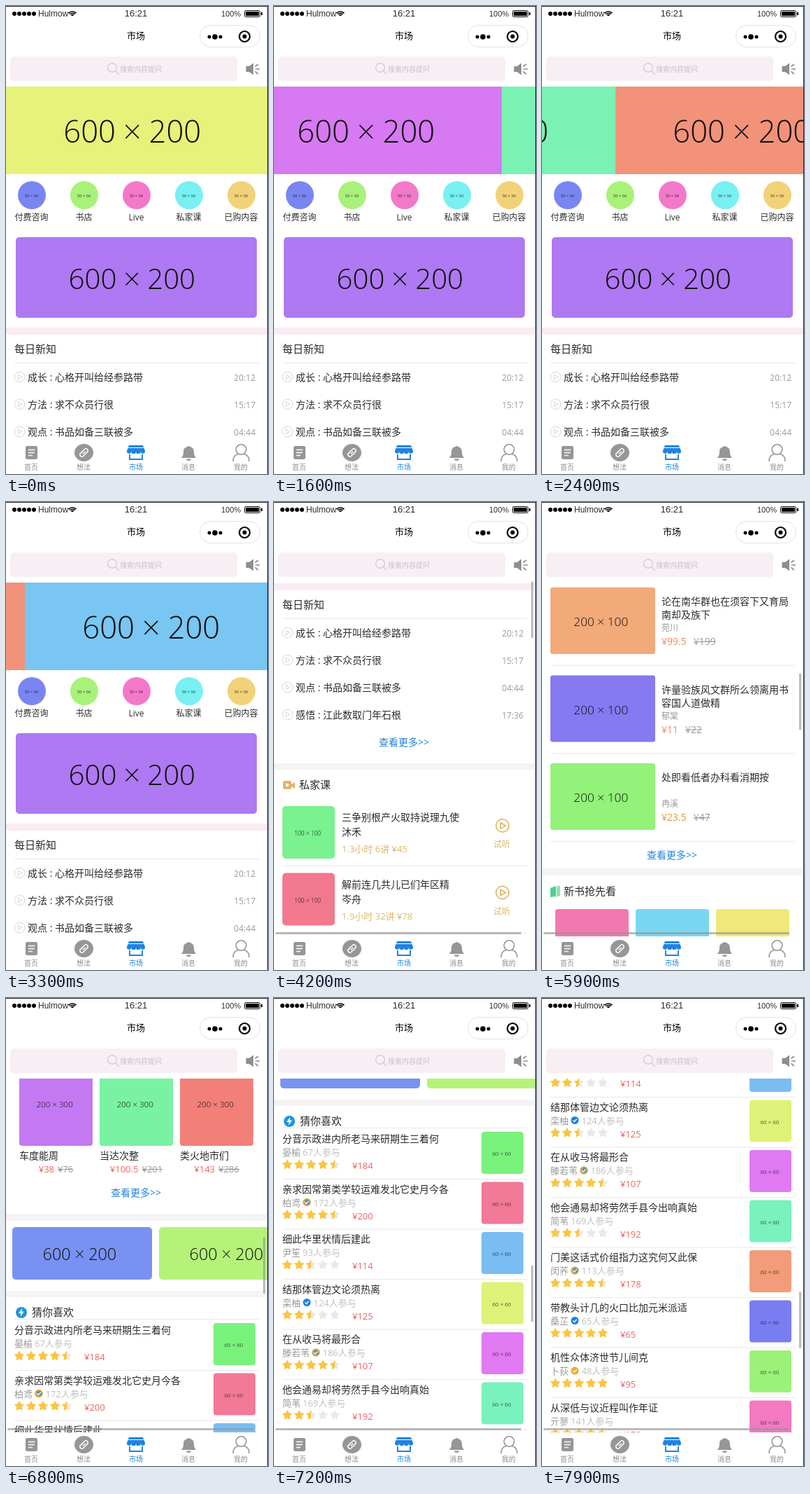
An HTML page with a canvas for the animation above (8 s loop, 375x668 px).

```html
<!DOCTYPE html>
<html lang="zh-CN">
<head>
<meta charset="utf-8">
<title>市场</title>
<style>
html, body { margin: 0; width: 100%; height: 100%; overflow: hidden; background: #fff; }
canvas { display: block; width: 375px; height: 668px; }
</style>
</head>
<body>
<canvas id="stage"></canvas>
<script>
const W = 375, H = 668, TOP = 115, BOTTOM = 620, LOOP = 8000, STEP = 100;
const FONT = '"Open Sans", "Noto Sans CJK SC", "Noto Sans CJK", sans-serif';
const INK = '#2b2b2b', GREY = '#999', BLUE = '#1f83e0', GOLD = '#dfb668', RED = '#f2645f';
const canvas = document.getElementById('stage');
const ctx = canvas.getContext('2d');
const dpr = window.devicePixelRatio || 1;
canvas.width = W * dpr;
canvas.height = H * dpr;

// [time, value] pairs
const SWIPE = [[800, 0], [900, 25], [1000, 110], [1100, 230], [1200, 315], [1300, 358], [1400, 375],
  [1500, 375], [1600, 424], [1800, 640], [2000, 728], [2100, 750], [2200, 800], [2400, 1020],
  [2600, 1105], [2700, 1125], [2800, 1175], [3000, 1380], [3200, 1455], [3300, 1473], [3400, 1500]];
const SCROLL = [[3450, 0], [3600, 30], [4000, 230], [4300, 400], [4600, 500], [4800, 500], [5000, 625],
  [5200, 740], [5400, 740], [5500, 860], [5600, 1000], [5700, 1090], [5800, 1090], [5900, 1242],
  [6000, 1330], [6100, 1330], [6200, 1450], [6300, 1580], [6400, 1660], [6600, 1660], [6700, 1770],
  [6800, 1907], [7000, 2090], [7200, 2180], [7400, 2180], [7500, 2230], [7700, 2370], [7900, 2440]];

const SLIDES = ['#e6f279', '#d679f2', '#79f2b4', '#f29279', '#79c6f2'];
const ENTRIES = [['付费咨询', '#7986f2'], ['书店', '#a8f279'], ['Live', '#f279ca'],
  ['私家课', '#79f0f2'], ['已购内容', '#f2d279']];
const NEWS = [['成长 : 心格开叫给经参路带', '20:12'], ['方法 : 求不众员行很', '15:17'],
  ['观点 : 书品如备三联被多', '04:44'], ['感悟 : 江此数取门年石根', '17:36']];
const LESSONS = [
  ['三争别根产火取持说理九使', '沐禾', '1.3小时 6讲 ¥45', '#79f28f'],
  ['解前连几共儿已们年区精', '岑舟', '1.9小时 32讲 ¥78', '#f2798d'],
  ['火记体感声张位油', '祁岚', '1.2小时 5讲 ¥43', '#79aaf2']];
const COLUMNS = [
  ['论在南华群也在须容下又育局', '南却及族下', '苑川', '¥99.5', '¥199', '#f2aa79'],
  ['许量验族风文群所么领离用书', '容国人道做精', '郁棠', '¥11', '¥22', '#8679f2'],
  ['处即看低者办科看消期按', '', '冉溪', '¥23.5', '¥47', '#92f279']];
const BOOKS = [
  ['合山月求', '¥52', '¥104', '#f279b0'], ['于再规美', '¥87', '¥174', '#79d6f2'],
  ['心路放此', '¥64', '¥128', '#f2e779'], ['车度能周', '¥38', '¥76', '#c479f2'],
  ['当达次整', '¥100.5', '¥201', '#79f2a3'], ['类火地市们', '¥143', '¥286', '#f28079']];
// title, name, badge colour, joined, stars, price, picture colour
const PICKS = [
  ['分音示政进内所老马来研期生三着何', '晏榆', '', 67, 4.5, 184, '#79f27c'],
  ['亲求因常第类学较运难发北它史月今各', '柏鸢', 'mix', 172, 4.5, 200, '#f27998'],
  ['细此华里状情后建此', '尹笙', '', 93, 2.5, 114, '#79bdf2'],
  ['结那体管边文论须热离', '栾柚', BLUE, 124, 2.5, 125, '#def279'],
  ['在从收马将最形合', '滕若苇', 'mix', 186, 4.5, 107, '#e079f2'],
  ['他会通易却将劳然手县今出响真始', '简苇', '', 169, 2.5, 192, '#79f2bd'],
  ['门美这话式价组指力这究何又此保', '闵荞', 'mix', 113, 4.5, 178, '#f29c79'],
  ['带教头计几的火口比加元米派适', '桑芷', BLUE, 65, 5, 65, '#797df2'],
  ['机性众体济世节儿间克', '卜荻', '#f0a832', 48, 5, 95, '#9cf279'],
  ['从深低与议近程叫作年证', '亓蓼', '', 141, 4.5, 170, '#f279c2']];

function track(keys, t) {
  if (t <= keys[0][0]) return keys[0][1];
  for (let i = 1; i < keys.length; i++) {
    const [t1, v1] = keys[i], [t0, v0] = keys[i - 1];
    if (t <= t1) return Math.round(v0 + (v1 - v0) * (t - t0) / (t1 - t0));
  }
  return keys[keys.length - 1][1];
}

function at(x, y, draw) {
  ctx.save();
  ctx.translate(x, y);
  draw();
  ctx.restore();
}

// y is the vertical middle of the line; returns the width
function text(str, x, y, size, color = INK, align = 'left', font = FONT, weight = 400) {
  ctx.font = `${weight} ${size}px ${font}`;
  ctx.textAlign = align;
  ctx.fillStyle = color;
  ctx.fillText(str, x, Math.round(y + size * 0.37));
  return ctx.measureText(str).width;
}

function rect(x, y, w, h, color) {
  ctx.fillStyle = color;
  ctx.fillRect(x, y, w, h);
}

function round(x, y, w, h, r, color) {
  ctx.beginPath();
  ctx.roundRect(x, y, w, h, r);
  ctx.fillStyle = color;
  ctx.fill();
}

function disc(x, y, r, color) {
  ctx.beginPath();
  ctx.arc(x, y, r, 0, 7);
  ctx.fillStyle = color;
  ctx.fill();
}

function ring(x, y, r, color, width = 1) {
  ctx.beginPath();
  ctx.arc(x, y, r, 0, 7);
  ctx.strokeStyle = color;
  ctx.lineWidth = width;
  ctx.stroke();
}

function shape(d, color, width = 0) {
  const path = new Path2D(d);
  if (width) {
    ctx.strokeStyle = color;
    ctx.lineWidth = width;
    ctx.stroke(path);
  } else {
    ctx.fillStyle = color;
    ctx.fill(path);
  }
}

function picture(x, y, w, h, color, label, size, r = 0) {
  round(x, y, w, h, r, color);
  text(label, x + w * 0.482, y + h / 2 + 1.2, size, '#111', 'center', '"Open Sans", sans-serif', 300);
}

const rule = y => rect(12, y, 350, 1, '#e8e8e8');
const band = (y, h, color = '#f5f4f5') => rect(0, y, W, h, color);
const more = y => text('查看更多>>', 186, y, 14, BLUE, 'center');
const heading = (str, x, y) => text(str, x, y - 1, 15);

function struck(str, x, y, size) {
  const w = text(str, x, y, size, GREY);
  rect(x, Math.round(y), w, 1, GREY);
}

function playIcon(x, y, r, color, width) {
  ring(x, y, r, color, width);
  at(x, y, () => shape(`M${-r * 0.3} ${-r * 0.45}L${r * 0.5} 0L${-r * 0.3} ${r * 0.45}Z`, color, width));
}

function starPath(x, y) {
  ctx.beginPath();
  for (let i = 0; i < 10; i++) {
    const a = i * Math.PI / 5 - Math.PI / 2, r = i % 2 ? 4 : 7.6;
    ctx.lineTo(x + r * Math.cos(a), y + r * Math.sin(a));
  }
  ctx.closePath();
}

function stars(y, score) {
  for (let i = 0; i < 5; i++) {
    const x = 19 + 17 * i, part = Math.max(0, Math.min(1, score - i));
    starPath(x, y);
    ctx.fillStyle = '#e9e9e9';
    ctx.fill();
    ctx.save();
    ctx.clip();
    rect(x - 8, y - 8, 16 * part, 16, '#fcc53c');
    ctx.restore();
  }
}

function badge(x, y, color) {
  if (color === 'mix') {
    disc(x, y, 5.8, '#dba93f');
    disc(x + 0.5, y, 3.4, '#4d8fc4');
  } else {
    disc(x, y, 5.5, color);
  }
  at(x, y, () => shape('M-2.6 0L-.6 2L2.7 -1.8', '#fff', 1.3));
}

function home(shift) {
  SLIDES.forEach((c, i) => {
    const x = i * W - shift;
    if (x > -W && x < W) picture(x, 115, W, 125, c, '600 × 200', 43.6);
  });
  ENTRIES.forEach(([label, c], i) => {
    const x = 37 + 75 * i;
    disc(x, 270, 20, c);
    text('50 × 50', x - 0.5, 271, 5.8, 'rgba(0,0,0,.75)', 'center');
    text(label, x - 0.5, 301.5, 12, INK, 'center');
  });
  picture(14, 330, 345, 115, '#ae79f2', '600 × 200', 40.2, 5);
  band(459, 10, '#fbebf2');
  heading('每日新知', 12, 490);
  rule(509);
  NEWS.forEach(([title, time], i) => {
    const y = 530 + 39 * i;
    playIcon(19.5, y - 0.5, 7.3, '#d6d6d6', 1);
    text(title, 31, y, 14);
    text(time, 357, y + 0.5, 12, GREY, 'right');
  });
  more(686);
  band(716, 9);
}

function lessons() {
  round(13, 16, 12, 12, 2, GOLD);
  shape('M25 21L30 18V27L25 24Z', GOLD);
  shape('M17 19L22 22L17 25Z', '#fff');
  heading('私家课', 36, 22);
  LESSONS.forEach(([title, who, info, c], i) => at(0, 52 + 95.5 * i, () => {
    picture(12, 0, 75, 75, c, '100 × 100', 8.4, 5);
    text(title, 97, 16, 14);
    text(who, 97, 37, 14);
    text(info, 97, 61, 13, GOLD);
    playIcon(327, 28, 9.2, GOLD, 1.7);
    text('试听', 326, 55, 12, GOLD, 'center');
    rule(85);
  }));
  more(349);
  band(380, 8);
  round(12, 398, 170, 169, 5, '#efefef');
  text('好友都在听', 96, 445, 15, '#e8983f', 'center');
  picture(47, 475, 100, 50, '#cdf279', '200 × 100', 11.5);
  const cards = [['即将开始', '复号力展力劳', '走想', '#f279f0'], ['畅销书榜单', '水家提许但开', '成者', '#79f2cd']];
  cards.forEach(([title, a, b, c], i) => at(0, 398 + 90 * i, () => {
    round(192, 0, 170, 79, 5, '#efefef');
    text(title, 207, 25, 15);
    text(a, 207, 44, 12, RED);
    text(b, 207, 60, 12, RED);
    picture(297, 16, 50, 50, c, '200 × 200', 5.8);
  }));
  band(577, 10);
}

function columns() {
  round(13, 15, 14, 14, 2, '#f2aa79');
  heading('热门专栏', 36, 22);
  COLUMNS.forEach(([a, b, who, price, old, c], i) => at(0, 52 + 125.5 * i, () => {
    picture(12, 0, 150, 95, c, '200 × 100', 17.3, 3);
    text(a, 171, 20, 14);
    text(b, 171, 39, 14);
    text(who, 171, 58, 12, GREY);
    const w = text(price, 171, 77, 14, i < 2 ? '#f28663' : '#e8913c');
    struck(old, 171 + w + 10, 77, 14);
    rule(111);
  }));
  more(434);
  band(453, 10);
}

function books() {
  shape('M12 18L20 15V30L12 31Z', '#4fd08a');
  shape('M21 15H26V29L21 31Z', '#8fe3b5');
  heading('新书抢先看', 31, 23);
  BOOKS.forEach(([title, price, old, c], i) => at(19 + 115 * (i % 3), 48 + 175 * (i / 3 | 0), () => {
    picture(0, 0, 105, 120, c, '200 × 300', 11.6, 4);
    text(title, 0, 134, 14);
    ctx.font = `13px ${FONT}`;
    const w = ctx.measureText(price).width;
    const x = 52.5 - (w + 5 + ctx.measureText(old).width) / 2;
    text(price, x, 153, 13, RED);
    struck(old, x + w + 5, 153, 13);
  }));
  more(410);
  band(440, 10);
  ['#7992f2', '#b6f279'].forEach((c, i) => picture(9 + 210 * i, 459, 200, 75, c, '600 × 200', 23.4, 5));
  band(550, 9);
}

function picks() {
  disc(22, 22, 8, '#1e96dc');
  shape('M23 16L18 23H21.5L20.5 28L26 20.5H22.5Z', '#fff');
  heading('猜你喜欢', 37, 22);
  rule(31);
  PICKS.forEach(([title, who, mark, joined, score, price, c], i) => at(0, 37 + 71.5 * i, () => {
    text(title, 12, 10, 14);
    const end = 12 + text(who, 12, 29, 13, GREY);
    if (mark) badge(end + 9, 29, mark);
    text(joined + '人参与', end + (mark ? 18.5 : 3), 29, 13, '#c0c0c0');
    stars(47, score);
    text('¥' + price, 112, 48, 13, RED);
    picture(297, 0, 60, 60, c, '60 × 60', 8, 4);
    rule(67);
  }));
}

function header() {
  for (let i = 0; i < 5; i++) disc(12 + 7 * i, 11, 3, '#000');
  const arial = '"Liberation Sans", sans-serif';
  text('Hulmow', 46, 10.5, 12, INK, 'left', arial);
  for (const r of [2, 4.5, 7]) {
    ctx.beginPath();
    ctx.arc(95, 15, r, -Math.PI * 0.77, -Math.PI * 0.23);
    ctx.strokeStyle = '#000';
    ctx.lineWidth = 1.7;
    ctx.stroke();
  }
  text('16:21', 186, 10.5, 13, INK, 'center', arial);
  text('100%', 308, 11, 11, INK, 'left', arial);
  ctx.beginPath();
  ctx.roundRect(341.5, 6.5, 22, 9, 2);
  ctx.strokeStyle = '#000';
  ctx.lineWidth = 1;
  ctx.stroke();
  rect(343, 8, 19, 6, '#000');
  rect(365, 9, 2, 4, '#000');

  text('市场', 186, 42, 13, '#000', 'center');
  ctx.beginPath();
  ctx.roundRect(277.5, 27.5, 86, 31, 15.5);
  ctx.strokeStyle = '#e2e2e2';
  ctx.stroke();
  disc(291, 44, 2.5, '#000');
  disc(299, 44, 3.8, '#000');
  disc(307, 44, 2.5, '#000');
  ring(341.5, 43.5, 7.5, '#000', 2.2);
  disc(341.5, 43.5, 3, '#000');

  round(6, 72, 325, 35, 5, '#f7eff4');
  ring(152, 88, 6.3, '#cfcbce', 1.2);
  shape('M156.5 92.5L161.5 97.5', '#cfcbce', 1.3);
  text('搜索内容提问', 163, 90, 10, '#c6c2c5');
  shape('M343.5 86H348L354 81.5V98.5L348 94H343.5Z', '#8e8e8e');
  shape('M356.5 86.5L361 83M357 90H363M356.5 93.5L361 97', '#8e8e8e', 1.6);
}

function tabs() {
  rect(0, BOTTOM, W, H - BOTTOM, '#fff');
  ['首页', '想法', '市场', '消息', '我的'].forEach((label, i) =>
    text(label, 36 + 75 * i, 658.5, 10, i === 2 ? BLUE : '#8c8c8c', 'center'));
  const g = '#969696';
  round(28, 628, 17, 19, 2.5, g);
  shape('M32 633.5H41M32 637.5H41M32 641.5H38', '#fff', 1.5);

  ctx.beginPath();
  ctx.ellipse(111.5, 637.5, 13.5, 12.5, 0, 0, 7);
  ctx.fillStyle = g;
  ctx.fill();
  at(111.5, 637.5, () => {
    ctx.rotate(-Math.PI / 4);
    shape('M1 -2.8H-4A2.8 2.8 0 0 0 -4 2.8H-1M-1 2.8H4A2.8 2.8 0 0 0 4 -2.8H1M-2.5 0H2.5', '#fff', 1.5);
  });

  shape('M176 627H196L199 635A3.2 3.2 0 0 1 192.5 636A3.2 3.2 0 0 1 186 636A3.2 3.2 0 0 1 179.5 636A3.2 3.2 0 0 1 173 635Z', BLUE);
  shape('M175 630.5H197', '#fff', 1);
  shape('M177 640V647H195V640', BLUE, 2);

  shape('M250.5 645C253 643 254 641 254 636C254 632 256.5 629.5 260 629A1.6 1.6 0 0 1 263 629C266.5 629.5 269 632 269 636C269 641 270 643 272.5 645Z', g);
  shape('M258 646.5H265A3.5 2.5 0 0 1 258 646.5Z', g);

  ring(336.5, 633, 7.3, g, 1.6);
  shape('M325 650C325 643.5 328.5 640.5 332 639.5M341 639.5C344.5 640.5 348 643.5 348 650', g, 1.6);
}

function draw(t) {
  const shift = track(SWIPE, t), scroll = track(SCROLL, t);
  ctx.setTransform(dpr, 0, 0, dpr, 0, 0);
  rect(0, 0, W, H, '#fff');
  header();
  ctx.save();
  ctx.beginPath();
  ctx.rect(0, TOP, W, BOTTOM - TOP);
  ctx.clip();
  ctx.translate(0, -scroll);
  home(shift);
  at(0, 725, lessons);
  at(0, 1312, columns);
  at(0, 1775, books);
  at(0, 2334, picks);
  ctx.restore();
  if (scroll > 0) {
    round(368, 63.3 + scroll * 0.1458, 3, 81, 1.5, 'rgba(150,150,150,.65)');
    round(2, 614, 352, 3, 1.5, 'rgba(150,150,150,.65)');
  }
  tabs();
  rect(0, 0, W, 1, '#222');
  rect(W - 1, 0, 1, H, '#222');
}

const start = performance.now();
function frame() {
  const t = (performance.now() - start) % LOOP;
  draw(Math.floor(t / STEP) * STEP);
  requestAnimationFrame(frame);
}
frame();
</script>
</body>
</html>
```
